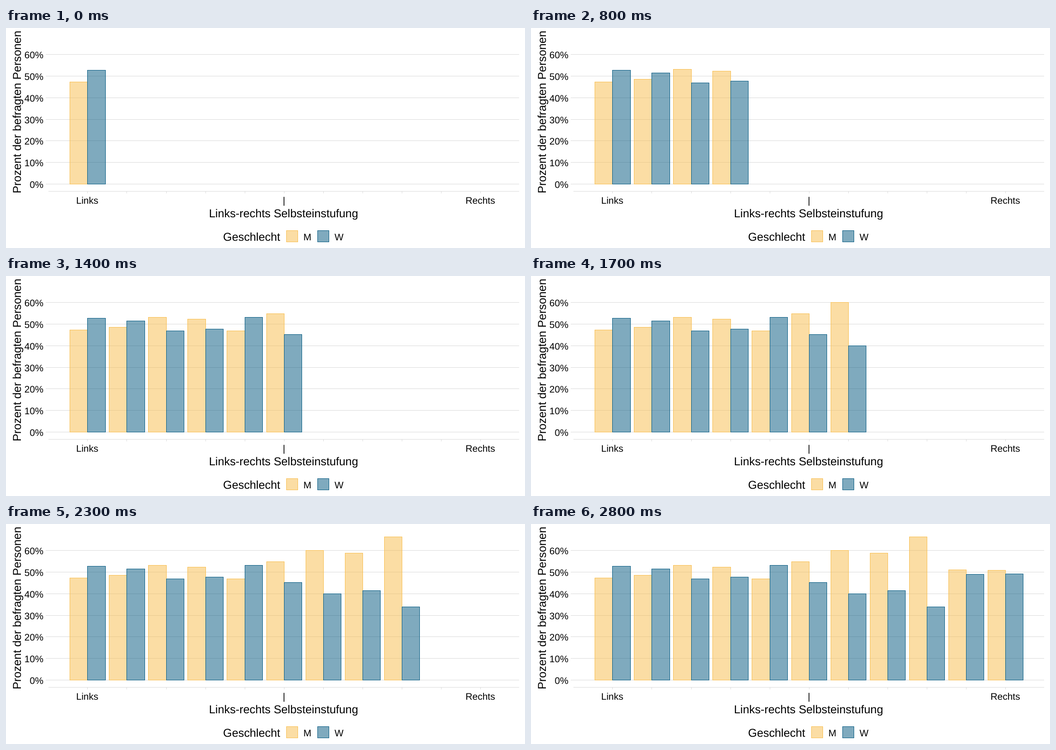
Recreate the animation shown at these times as an HTML page with a canvas. Size 1150x487 px, loop 5000 ms.

```html
<!DOCTYPE html>
<html lang="de">
<head>
<meta charset="utf-8">
<title>Links-rechts Selbsteinstufung</title>
<style>
  html, body { margin: 0; width: 100%; height: 100%; overflow: hidden; background: #fff; }
  canvas { display: block; }
</style>
</head>
<body>
<canvas id="stage" width="1150" height="487"></canvas>
<script>
const ctx = document.getElementById('stage').getContext('2d');
const LOOP = 5000;
const SMALL = 21;
const LARGE = 25.3;
const GRAY = '#d9d9d9';
const MEN = '#f7bc4b';
const WOMEN = '#00577f';
const HALF = 39.15;

// Percentage of men from left to right; women make up the rest
const menShare = [47.3, 48.6, 53.1, 52.3, 46.9, 54.8, 60, 58.7, 66.2, 51, 50.8];

const xAt = (i, offset = 0) => Math.round(180.4 + 87.05 * i + offset);
const yAt = percent => Math.round(345.2 - 4.788 * percent);

function rule(x, y, w, h) {
  ctx.fillStyle = GRAY;
  ctx.fillRect(x, y, w, h);
}

// Box whose border covers the given pixel rows and columns
function box(x0, y0, x1, y1, color) {
  ctx.fillStyle = ctx.strokeStyle = color;
  ctx.globalAlpha = 0.5;
  ctx.fillRect(x0, y0, x1 - x0 + 1, y1 - y0 + 1);
  ctx.globalAlpha = 1;
  ctx.strokeRect(x0 + 0.5, y0 + 0.5, x1 - x0, y1 - y0);
}

function label(text, x, y, size, align = 'left') {
  ctx.font = `${size}px "Liberation Sans", Arial, sans-serif`;
  ctx.textRendering = 'geometricPrecision';
  ctx.textAlign = align;
  ctx.fillStyle = '#000';
  ctx.fillText(text, x, y);
}

function drawAxes() {
  for (let p = 0; p <= 60; p += 10) {
    rule(88, yAt(p), 1049, 1);
    label(p + '%', 82.8, yAt(p) + 9, SMALL, 'right');
  }
  rule(94, 361, 1043, 1);
  menShare.forEach((_, i) => rule(xAt(i), 361, 1, 5));
  ['Links', '|', 'Rechts'].forEach((text, k) => label(text, xAt(5 * k), 389, SMALL, 'center'));
  label('Links-rechts Selbsteinstufung', 615, 419, LARGE, 'center');

  ctx.save();
  ctx.translate(33, 366);
  ctx.rotate(-Math.PI / 2);
  label('Prozent der befragten Personen', 0, 0, LARGE);
  ctx.restore();
}

function drawLegend() {
  label('Geschlecht', 481, 471, LARGE);
  [['M', MEN], ['W', WOMEN]].forEach(([text, color], k) => {
    const x = 621 + 69 * k;
    box(x, 448, x + 25, 473, color);
    label(text, x + 38, 470, SMALL);
  });
}

function drawGroup(i) {
  const mid = xAt(i);
  box(xAt(i, -HALF), yAt(menShare[i]), mid, yAt(0), MEN);
  box(mid, yAt(100 - menShare[i]), xAt(i, HALF), yAt(0), WOMEN);
}

// One more group every 300 ms; the last follows a little sooner
function shownGroups(t) {
  return t >= 2800 ? menShare.length : 1 + Math.floor((t + 100) / 300);
}

function draw(t) {
  ctx.fillStyle = '#fff';
  ctx.fillRect(0, 0, 1150, 487);
  drawAxes();
  drawLegend();
  for (let i = 0; i < shownGroups(t); i++) drawGroup(i);
}

const start = performance.now();
function tick() {
  draw((performance.now() - start) % LOOP);
  requestAnimationFrame(tick);
}
tick();
</script>
</body>
</html>
```
